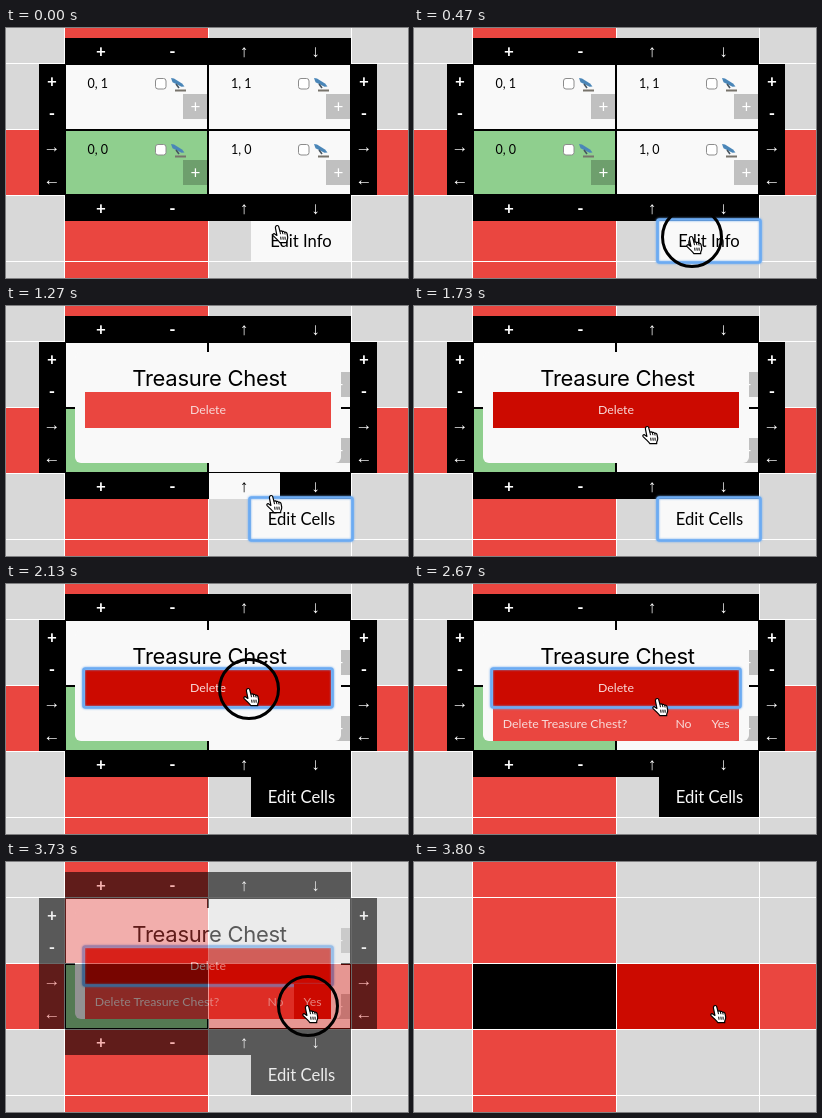
Animation, 402 px wide and 250 px high, one loop 4540 ms. Source, as an HTML page:

```html
<!DOCTYPE html>
<html lang="en">
<head>
<meta charset="utf-8">
<title>Cell editor</title>
<style>
html, body { margin: 0; width: 100%; height: 100%; overflow: hidden; background: #d8d8d8; }
svg { display: block; }
#stage { width: 402px; height: 250px; font-family: Lato, "Open Sans", sans-serif; }
text { text-anchor: middle; }

.red { fill: #ea4640; }
.dark { fill: #cc0a00; }
.paper { fill: #f9f9f9; }
.bar { fill: #fff; font-size: 17px; font-weight: 700; }
.arrow { font: 17px "Liberation Sans", Arial, sans-serif; }
.coord { font-size: 12.5px; text-anchor: start; }
.plus { fill: #fff; font-size: 17px; }
.small { fill: #f8dbd9; font-size: 12.3px; }
.edit { font-size: 16.6px; }
.title { font: 22px Inter, Roboto, sans-serif; letter-spacing: -.3px; }
.glow { fill: none; stroke: #6cabf2; stroke-width: 2.6; filter: drop-shadow(0 0 1px #6cabf2); }

/* shared 4540 ms clock */
.a { animation: 4.54s linear infinite; }
.s { animation: 4.54s step-end infinite; }

#editor { animation-name: editor; }
@keyframes editor {
  0%, 80.84% { opacity: 1; }
  82.16% { opacity: .6; }
  83.7%, 100% { opacity: 0; }
}
#panel { animation-name: panel; }
@keyframes panel {
  0%, 11.66% { opacity: 0; transform: translateX(36px); }
  11.67% { opacity: .35; transform: translateX(30px); animation-timing-function: ease-out; }
  17.62%, 100% { opacity: 1; transform: none; }
}
#info { animation-name: info; }
@keyframes info { 0% { opacity: 1; } 11.67%, 100% { opacity: 0; } }
#cells { animation-name: cells; }
@keyframes cells { 0% { opacity: 0; } 11.67%, 100% { opacity: 1; } }
#editBox { animation-name: editBox; }
@keyframes editBox { 0% { fill: #f9f9f9; } 45.59%, 100% { fill: #000; } }
#editText { animation-name: editText; }
@keyframes editText { 0% { fill: #000; } 45.59%, 100% { fill: #f9f9f9; } }
#editGlow { animation-name: editGlow; }
@keyframes editGlow { 0% { opacity: 0; } 8.81% { opacity: 1; } 45.59%, 100% { opacity: 0; } }
#upHover { animation-name: upHover; }
@keyframes upHover { 0% { opacity: 0; } 26.43% { opacity: 1; } 30.84%, 100% { opacity: 0; } }
#delHover { animation-name: delHover; }
@keyframes delHover { 0%, 34.5% { opacity: 0; } 38.11%, 100% { opacity: 1; } }
#delGlow { animation-name: delGlow; }
@keyframes delGlow { 0% { opacity: 0; } 45.59%, 100% { opacity: 1; } }
.confirm { animation-name: confirm; }
@keyframes confirm {
  0%, 46.92% { clip-path: inset(0 0 100% 0); }
  50%, 100% { clip-path: inset(0 0 0 0); }
}
#noHover { animation-name: noHover; }
@keyframes noHover {
  0%, 61.7% { opacity: 0; }
  63.2%, 67% { opacity: 1; }
  68.9%, 100% { opacity: 0; }
}
#yesHover { animation-name: yesHover; }
@keyframes yesHover { 0%, 67% { opacity: 0; } 68.94%, 100% { opacity: 1; } }

#pointer { animation-name: pointer; }
@keyframes pointer {
  0%, 1.54% { transform: translate(272px, 198px); }
  7.27%, 24.2% { transform: translate(278px, 209px); }
  27.97%, 29.2% { transform: translate(266px, 190px); }
  35.24% { transform: translate(237px, 125px); }
  37%, 39% { transform: translate(234px, 121px); }
  44.05%, 57.3% { transform: translate(243px, 105px); }
  58.81%, 60% { transform: translate(244px, 115px); }
  64% { transform: translate(258px, 130px); }
  68.94% { transform: translate(288px, 138px); }
  74.89%, 100% { transform: translate(302px, 144px); }
}
#ring { animation-name: ring; }
@keyframes ring {
  0% { opacity: 0; }
  8.81% { opacity: 1; }
  11.67% { opacity: 0; }
  45.59% { opacity: 1; }
  48.46% { opacity: 0; }
  80.84% { opacity: 1; }
  83.7%, 100% { opacity: 0; }
}
</style>
</head>
<body>
<svg id="stage" viewBox="0 0 402 250" width="402" height="250">
  <defs>
    <g id="tools">
      <rect x="89.5" y="13.5" width="10.5" height="10.5" rx="2.5" fill="#fff" stroke="#8c8c8c"/>
      <path d="M105 13l3 .5 8 5 2.500 3-3 .3-9-4.500z" fill="#4a86b8"/>
      <path d="M110 19l3 4" stroke="#46545f" stroke-width="1.5"/>
      <path d="M109 25.500h11" stroke="#77736b" stroke-width="2"/>
      <path d="M117 29h25v25h-25z" fill-opacity=".23"/>
      <text class="plus" x="129.5" y="47.5">+</text>
    </g>
    <g id="hbar">
      <path d="M59 0h286v26H59z"/>
      <g class="bar">
        <text x="95" y="18.5">+</text>
        <text x="166.5" y="18.5">-</text>
        <text class="arrow" x="238" y="19">↑</text>
        <text class="arrow" x="309.5" y="19">↓</text>
      </g>
    </g>
    <g id="vbar">
      <path d="M0 36h26v131H0z"/>
      <g class="bar">
        <text x="13" y="58.5">+</text>
        <text x="13" y="91">-</text>
        <text class="arrow" x="13" y="124">→</text>
        <text class="arrow" x="13" y="157">←</text>
      </g>
    </g>
    <clipPath id="frame"><path d="M33 36h338v131H33z"/></clipPath>
    <clipPath id="panelShape"><rect x="69" y="46" width="266" height="111" rx="6"/></clipPath>
  </defs>

  <!-- map -->
  <path fill="#d8d8d8" d="M0 0h402v250H0z"/>
  <path class="red" d="M59 0h143v250H59zM0 102h402v65H0z"/>
  <path d="M59 102h143v65H59z"/>
  <path class="dark" d="M203 102h142v65H203z"/>
  <path fill="none" stroke="#fff" d="M58.5 0v250M202.5 0v250M345.5 0v250M0 35.5h402M0 101.5h402M0 167.5h402M0 233.5h402"/>

  <g id="editor" class="a">
    <path d="M59 36h286v131H59z"/>
    <path class="paper" d="M60 37h141v64H60zM203 37h141v64H203zM203 103h141v63H203z"/>
    <path fill="#8fcf8e" d="M60 103h141v63H60z"/>
    <use href="#tools" x="60" y="37"/>
    <use href="#tools" x="203" y="37"/>
    <use href="#tools" x="60" y="103"/>
    <use href="#tools" x="203" y="103"/>
    <text class="coord" x="81.5" y="60">0, 1</text>
    <text class="coord" x="225" y="60">1, 1</text>
    <text class="coord" x="81.5" y="126">0, 0</text>
    <text class="coord" x="225" y="126">1, 0</text>

    <use href="#hbar" y="10"/>
    <use href="#hbar" y="167"/>
    <use href="#vbar" x="33"/>
    <use href="#vbar" x="345"/>
    <g id="upHover" class="s">
      <path class="paper" d="M203 167h71v26h-71z"/>
      <text class="arrow" x="238" y="186">↑</text>
    </g>

    <g clip-path="url(#frame)">
      <g id="panel" class="a">
        <g clip-path="url(#panelShape)">
          <path class="paper" d="M69 46h266v111H69z"/>
          <text class="title" x="203.5" y="80">Treasure Chest</text>
          <path class="red" d="M79 86h246v36H79z"/>
          <path id="delHover" class="dark a" d="M79 86h246v36H79z"/>
          <text class="small" x="202" y="108">Delete</text>
          <path class="red confirm a" d="M79 122h246v36H79z"/>
          <rect id="delGlow" class="glow s" x="77.5" y="84.5" width="249" height="39" rx="2"/>
          <g class="confirm a">
            <path id="noHover" class="dark a" d="M249 122h39v36h-39z"/>
            <path id="yesHover" class="dark a" d="M288 122h37v36h-37z"/>
            <text class="small" x="151" y="144">Delete Treasure Chest?</text>
            <text class="small" x="269.5" y="144">No</text>
            <text class="small" x="306.5" y="144">Yes</text>
          </g>
        </g>
      </g>
    </g>

    <path id="editBox" class="s" d="M245 193h100v40H245z"/>
    <g id="editText" class="edit s">
      <text id="info" class="s" x="295" y="219">Edit Info</text>
      <text id="cells" class="s" x="295.5" y="219">Edit Cells</text>
    </g>
    <rect id="editGlow" class="glow s" x="243.5" y="191.5" width="103" height="43" rx="2"/>
  </g>

  <g id="pointer" class="a">
    <circle id="ring" class="s" r="29.5" fill="none" stroke="#000" stroke-width="3"/>
    <g transform="translate(-6.3 -1.3)" stroke="#000" stroke-linejoin="round">
      <path fill="#fff" stroke-width="1.2" d="M4.2 1.5C4.8.4 6.6.6 7 1.9L8.2 6.5C9 5.9 10.2 6 10.7 6.9 11.6 6.4 12.6 6.8 13 7.6 14.2 7.2 15.2 7.9 15.4 9.1L16 12.5C16.2 14 15.6 15.3 15 16.5V18H8.2C7.2 16.4 5.6 15 4.2 13.6L1.4 10.9C.6 10 1.7 8.6 3 9.2L5.2 10.7 3.8 3.6C3.6 2.8 3.7 2.1 4.2 1.5Z"/>
      <path fill="none" d="M8.2 6.5l.6 3M10.7 6.9l.5 2.6M13 7.6l.4 2.2M9 12l.3 3M11.2 12l.3 3M13.3 12l.2 3"/>
    </g>
  </g>
</svg>
</body>
</html>
```
